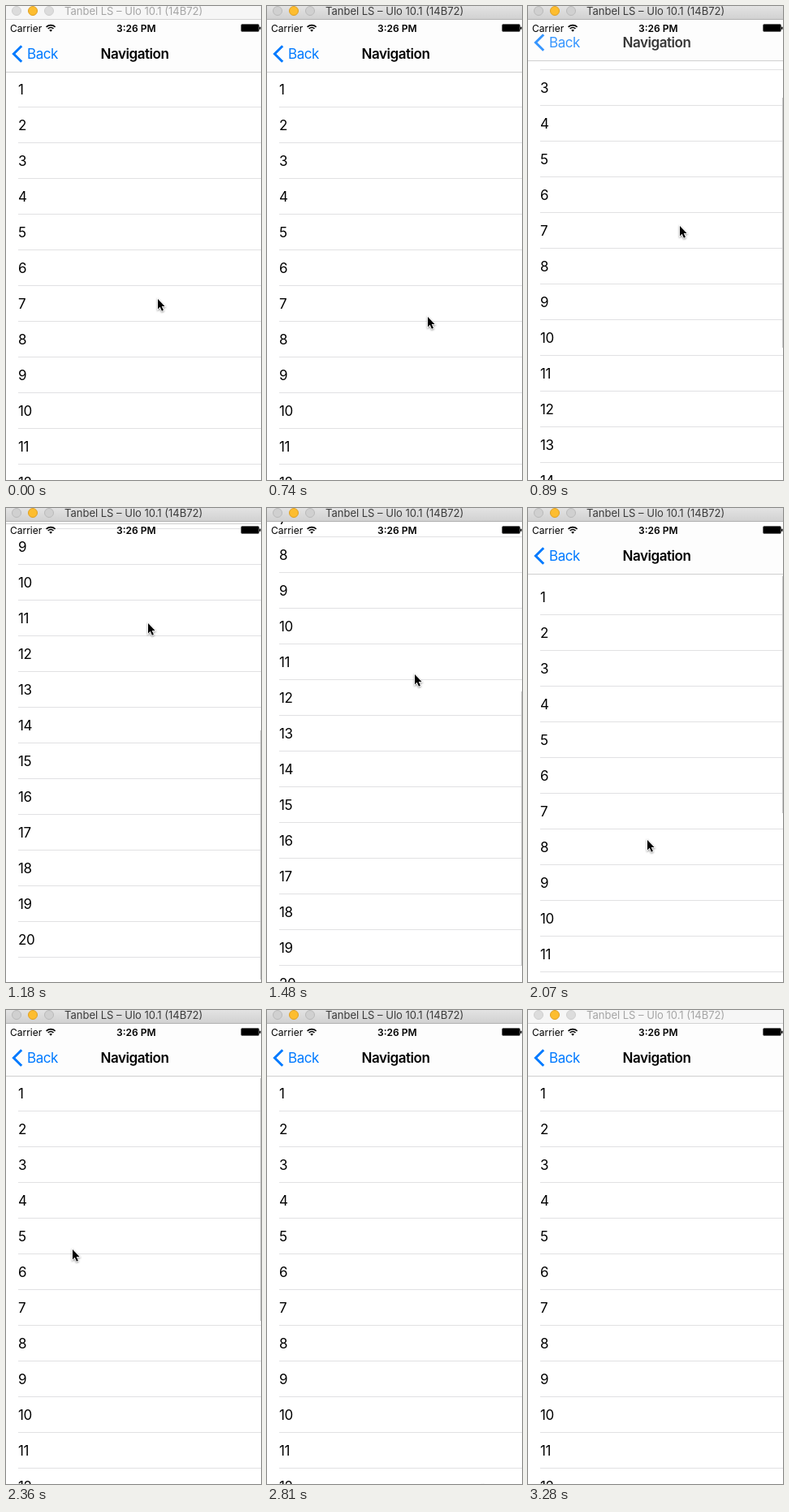
These frames come from a looping animation (314x584 px, 3380 ms). An HTML page:

```html
<!DOCTYPE html>
<html lang="en">
<head>
<meta charset="utf-8">
<title>Navigation list</title>
<style>
  html, body { margin: 0; width: 100%; height: 100%; overflow: hidden; background: #fff; }
  svg { display: block; font: 17px Inter, "Noto Sans", sans-serif; letter-spacing: -.45px; }
  .status { font-size: 12px; letter-spacing: 0; }
  .bold { font-weight: 600; }
  #caption { font-size: 13px; letter-spacing: 0; fill: #3a3a3a; }
  #window circle { fill: #d0d0d0; stroke: #bababa; }
  #window #minimize { fill: #fdbd2f; stroke: #dfa023; }
  #window.idle circle { fill: #dcdcdc; stroke: #cfcfcf; }
  #window.idle #caption { fill: #a5a5a5; }
  #window.idle #frame { fill: #f6f6f6; }
  #window.idle #edge { fill: #d3d3d3; }
  #cursor { filter: drop-shadow(0 1px 1px rgba(0, 0, 0, .45)); }
</style>
</head>
<body>
<svg width="314" height="584" viewBox="0 0 314 584">
  <defs>
    <linearGradient id="metal" x2="0" y2="1">
      <stop stop-color="#e3e3e3"/><stop offset="1" stop-color="#d1d1d1"/>
    </linearGradient>
  </defs>
  <rect width="314" height="584" fill="#fff"/>
  <g id="list"></g>
  <rect id="scrollbar" x="313" width="1" fill="#c8c8c8"/>
  <g id="bar">
    <rect y="17" width="314" height="64" fill="#fdfdfd"/>
    <rect y="81" width="314" height="1" fill="#cfcfcf"/>
    <g id="items">
      <path d="M19.2 49.2 9.4 59l9.8 9.8" fill="none" stroke="#007aff" stroke-width="3"/>
      <text x="26" y="65" fill="#007aff">Back</text>
      <text class="bold" x="116.5" y="65">Navigation</text>
    </g>
  </g>
  <text class="status" x="5" y="31.5">Carrier</text>
  <g fill="none" stroke="#000" stroke-width="1.6">
    <path d="M49.6 25.8a8 8 0 0 1 11 0M51.7 28a5 5 0 0 1 6.8 0"/>
    <path d="M55.1 31.8l-1.9-2a2.8 2.8 0 0 1 3.8 0z" fill="#000" stroke="none"/>
  </g>
  <text class="status bold" x="136" y="31.5">3:26 PM</text>
  <rect x="289.5" y="22.5" width="22" height="9" rx="1.5" stroke="#666"/>
  <rect x="312" y="25.5" width="1.5" height="3.5" rx=".7"/>
  <g id="window">
    <rect id="frame" width="314" height="16" fill="url(#metal)"/>
    <rect id="edge" y="16" width="314" height="1" fill="#b1b1b1"/>
    <circle cx="13" cy="6" r="5.5"/>
    <circle id="minimize" cx="33" cy="6" r="5.5"/>
    <circle cx="53" cy="6" r="5.5"/>
    <text id="caption" x="72" y="11">Tanbel LS – Ulo 10.1 (14B72)</text>
  </g>
  <path id="cursor" d="M2 2v12.4l2.7-2.6 2.2 4.9 2-.9-2.2-4.8h3.8z" stroke="#fff" stroke-width="1.6" paint-order="stroke"/>
</svg>
<script>
const $ = id => document.getElementById(id);
const LOOP = 3380, TICK = 147.14, BOTTOM = 377, BAR = 64;

// The screen refreshes once per tick; tracks are [tick, value] key points
const pointerX = [[0, 185], [3, 197], [4, 197], [8, 173], [10, 180], [12, 209], [16, 80], [19, 264]];
const pointerY = [[0, 359], [3, 396], [4, 397], [8, 140], [10, 203], [12, 521], [16, 293], [19, 583]];
const pull = [[5, 0], [8, 407], [10, 353], [12, -59]];
const hide = [[5, 0], [8, 62], [9, 66], [10, 66], [12, 0]];

const easeInOut = (u, power) =>
  u < .5 ? (2 * u) ** power / 2 : 1 - (2 - 2 * u) ** power / 2;

function along(track, tick, power) {
  const next = track.findIndex(key => key[0] > tick);
  if (next < 1) return (next ? track.at(-1) : track[0])[1];
  const [[start, from], [end, to]] = track.slice(next - 1, next + 1);
  return Math.round(from + (to - from) * easeInOut((tick - start) / (end - start), power));
}

// After release the overscroll springs back exponentially
const scrollAt = tick => tick < 12
  ? along(pull, tick, 2)
  : Math.trunc(-59 * Math.exp(-1.05 * (tick - 12)));

for (let n = 1; n <= 20; n++) {
  $("list").innerHTML += `<text x="15" y="${65 + 44 * n}">${n}</text>
    <rect x="15" y="${80 + 44 * n}" width="299" height="1" fill="#e1e1e3"/>`;
}

const move = (id, x, y) => $(id).setAttribute("transform", `translate(${x} ${y})`);
const show = (id, visible) => $(id).style.display = visible ? "" : "none";

function placeScrollbar(scroll, slid) {
  const top = 84 - slid;
  const inside = Math.max(slid, Math.min(BOTTOM, scroll));
  const length = 299 + 39 * slid / BAR - Math.abs(scroll - inside);
  const y = top + (inside - slid) / (BOTTOM - slid) * (581 - length - top);
  $("scrollbar").setAttribute("y", Math.round(y));
  $("scrollbar").setAttribute("height", Math.round(length));
}

function draw(now) {
  const time = now % LOOP, tick = Math.floor(time / TICK);
  const scroll = scrollAt(tick), slid = along(hide, tick, 2);
  move("list", 0, -scroll);
  move("bar", 0, -slid);
  move("cursor", along(pointerX, tick, 3), along(pointerY, tick, 3));
  $("items").setAttribute("opacity", Math.max(0, 1 - slid / BAR));
  placeScrollbar(scroll, Math.min(slid, BAR));
  show("scrollbar", tick > 5 && tick < 17);
  show("cursor", tick < 20);
  $("window").classList.toggle("idle", tick < 5 || time >= 3280);
  requestAnimationFrame(draw);
}
requestAnimationFrame(draw);
</script>
</body>
</html>
```
